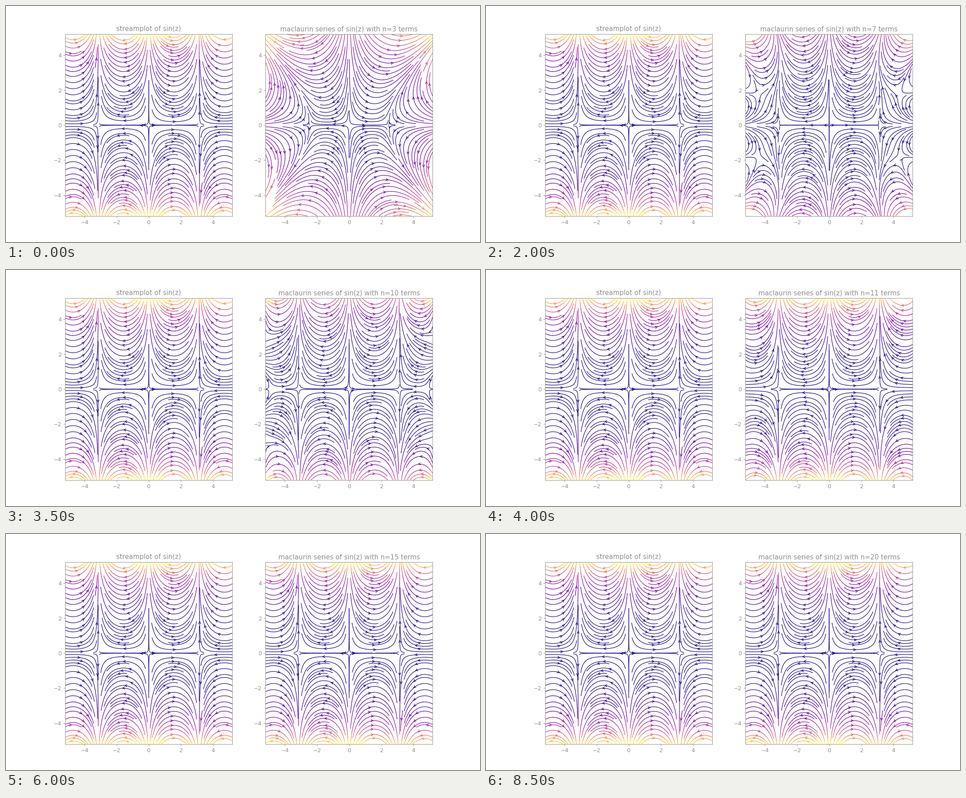
Write a matplotlib script that moves like this. It is 1058 by 529 pixels and loops after 9 s.

```python
import math

import matplotlib.pyplot as plt
import numpy as np
from matplotlib.animation import FuncAnimation

LIMIT = 5.2
FIRST, LAST = 3, 20
GREY = "#909090"

plt.rcParams.update({
    "font.family": "DejaVu Sans",
    "text.color": GREY,
    "axes.titlecolor": GREY,
    "axes.edgecolor": GREY,
    "xtick.color": GREY,
    "ytick.color": GREY,
})

side = np.linspace(-LIMIT, LIMIT, 50)
X, Y = np.meshgrid(side, side)
Z = X + 1j * Y


def maclaurin(z, order):
    """Maclaurin polynomial of sin(z) up to the given power."""
    total = np.zeros_like(z)
    for k in range(1, order + 1, 2):
        total += (-1) ** (k // 2) * z**k / math.factorial(k)
    return total


def draw_flow(ax, w):
    """Stream the conjugate field of w and return the artists it added."""
    before = set(ax.get_children())
    ax.streamplot(side, side, w.real, -w.imag, color=np.abs(w), cmap="plasma",
                  density=2, linewidth=1, arrowstyle="->")
    return [a for a in ax.get_children() if a not in before]


fig, (left, right) = plt.subplots(1, 2, figsize=(12, 6), dpi=1058 / 12)
for ax in (left, right):
    ax.set(xlim=(-LIMIT, LIMIT), ylim=(-LIMIT, LIMIT))

left.set_title("streamplot of sin(z)")
draw_flow(left, np.sin(Z))

# Even powers vanish, so only odd orders need their own picture.
layers = {k: draw_flow(right, maclaurin(Z, k))
          for k in range(FIRST, LAST + 1, 2)}


def update(frame):
    n = FIRST + frame
    order = n if n % 2 else n - 1
    for k, artists in layers.items():
        for artist in artists:
            artist.set_visible(k == order)
    right.set_title(f"maclaurin series of sin(z) with n={n} terms")
    return []


def init():
    return update(0)


anim = FuncAnimation(fig, update, frames=LAST - FIRST + 1, init_func=init,
                     interval=500, repeat=True, repeat_delay=0)
plt.show()
```
